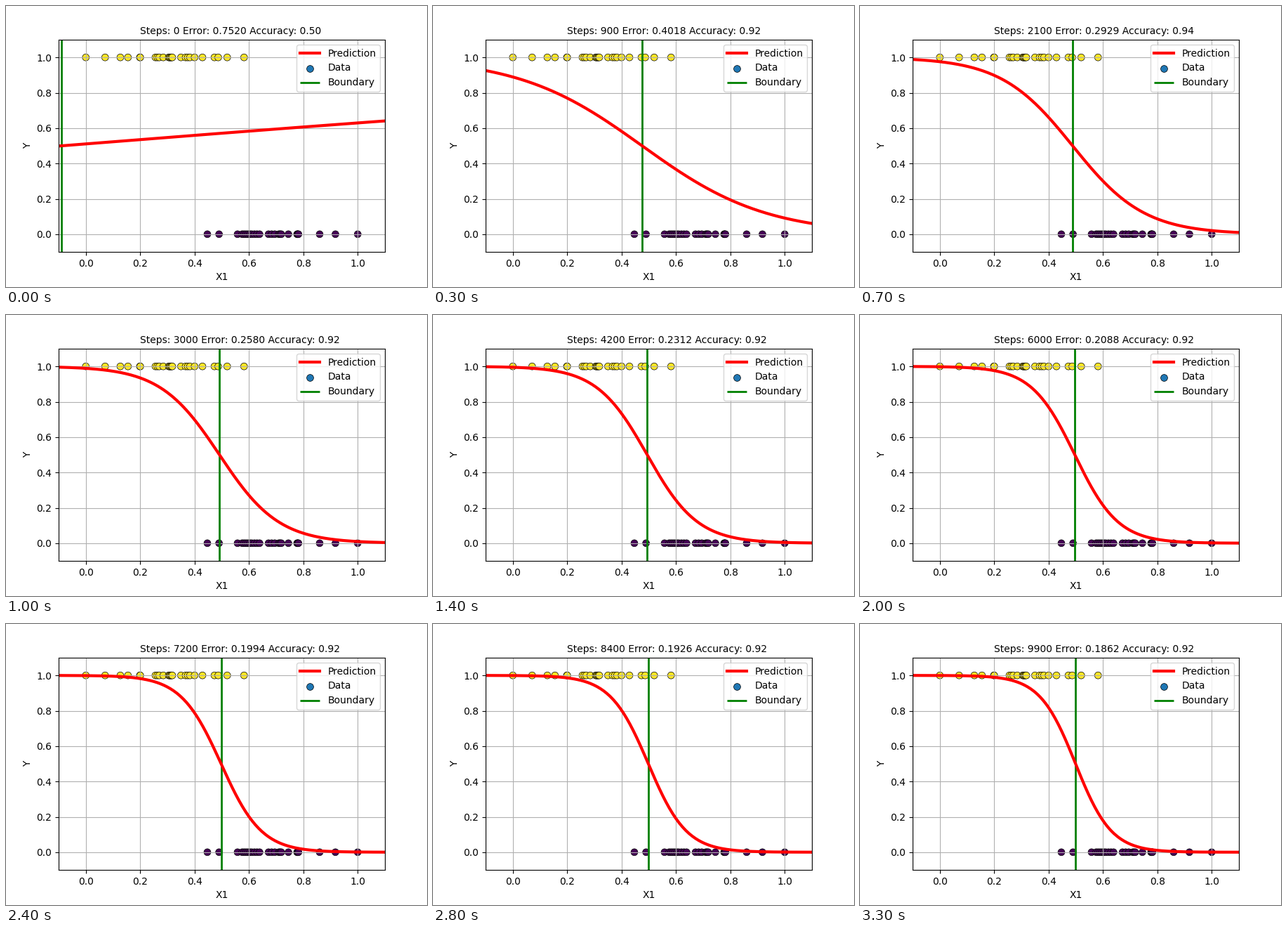
Recreate the animation shown at these times as a matplotlib script. Size 600 by 400 pixels, loop 3.4 s.

```python
import numpy as np
import matplotlib.pyplot as plt
from matplotlib.animation import FuncAnimation

FRAMES, INTERVAL = 34, 100
STRIDE, RATE = 300, 0.1
LIMITS = (-.1, 1.1)

# Two overlapping classes: single points and evenly spaced runs (start:stop:count)
ONES = np.r_[0, .071, .127, .155, .199:.2:2j, .256:.27:3j, .285, .305:.318:5j,
             .35, .367:.383:3j, .4, .429, .473, .487, .52, .582]
ZEROS = np.r_[.447, .49, .558, .575:.61:6j, .62:.639:3j, .672:.695:3j,
              .71:.719:3j, .745, .777:.782:3j, .86, .918, 1]
X = np.r_[ONES, ZEROS]
Y = np.r_[np.ones_like(ONES), np.zeros_like(ZEROS)]


def sigmoid(z):
    return 1 / (1 + np.exp(-z))


def train(w=.5, b=.0505):
    """Logistic regression by gradient descent; one state per drawn step."""
    states = []
    for step in range((FRAMES - 1) * STRIDE + 1):
        p = sigmoid(w * X + b)
        w -= RATE * np.mean((p - Y) * X)
        b -= RATE * np.mean(p - Y)
        if step % STRIDE == 0:
            error = -np.mean(np.log(np.where(Y == 1, p, 1 - p)))
            accuracy = np.mean((p > .5) == (Y == 1))
            states.append((step, w, b, error, accuracy))
    return states


states = train()

plt.rcParams["font.family"] = "DejaVu Sans"
fig, ax = plt.subplots(figsize=(6, 4), dpi=100)
fig.subplots_adjust(left=.125, right=.9, bottom=.125, top=.88)
ax.set(xlim=LIMITS, ylim=LIMITS, xlabel="X1", ylabel="Y")
ax.grid(True)

dots = dict(s=50, edgecolor="black", linewidth=.5)
line_x = np.linspace(*LIMITS, 200)
curve, = ax.plot([], [], color="red", lw=3, label="Prediction")
ax.scatter(X, Y, c=Y, cmap="viridis", **dots)
ax.scatter([], [], color="C0", label="Data", **dots).set_edgecolor("black")
boundary = ax.axvline(0, color="green", lw=2, solid_capstyle="butt",
                      zorder=1.9, label="Boundary")
title = ax.text(.2, 1.13, "", fontsize=10)
ax.legend(loc="upper right")


def draw(i):
    step, w, b, error, accuracy = states[i]
    curve.set_data(line_x, sigmoid(w * line_x + b))
    boundary.set_xdata([-b / w] * 2)
    title.set_text(f"Steps: {step} Error: {error:.4f} Accuracy: {accuracy:.2f}")
    return curve, boundary, title


anim = FuncAnimation(fig, draw, frames=FRAMES, interval=INTERVAL,
                     repeat=True, repeat_delay=0, blit=False)
plt.show()
```
